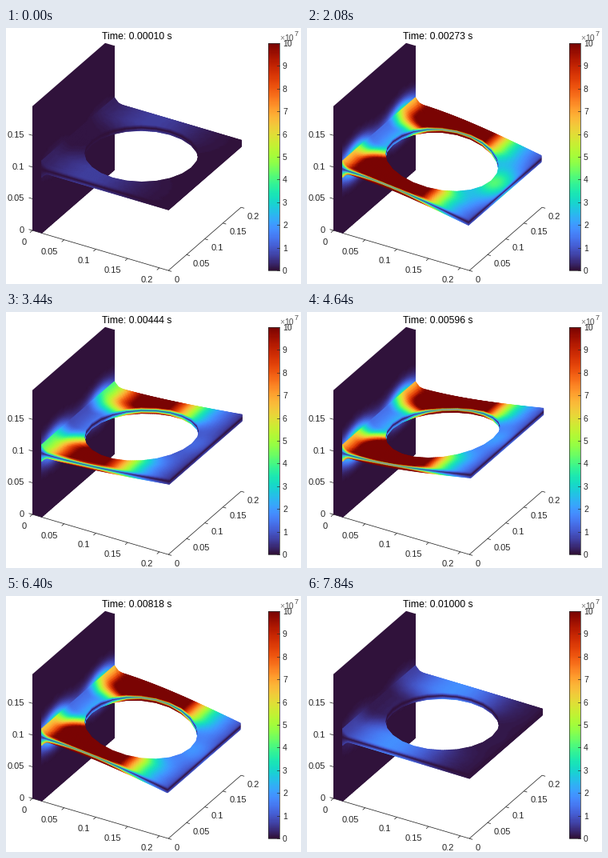
Animation, 369 px wide and 320 px high, one loop 7920 ms. Source, as a matplotlib script:

```python
import numpy as np
import matplotlib.pyplot as plt
from matplotlib.animation import FuncAnimation

W, H, DPI = 369, 320, 100
FRAMES, STEP = 99, 80
X0, SIDE, TOP, MID, HALF = 0.0145, 0.2, 0.196, 0.101, 0.005
HOLE, SIDES = 0.0787, 24
INK = "#262626"

plt.rcParams["font.family"] = "Liberation Sans"
fig = plt.figure(figsize=(W / DPI, H / DPI), dpi=DPI, facecolor="white")
ax = fig.add_axes([0, 0, 1, 1])
ax.set_xlim(0, W)
ax.set_ylim(H, 0)
ax.axis("off")


def project(x, y, z):
    return 33 + 794 * x + 455 * y, 253 + 234 * x - 395 * y - 792 * z


def label(x, y, s, size=8.0, ha="center", color=INK):
    return ax.text(x, y, s, fontsize=size, ha=ha, va="center_baseline", color=color)


def line(xs, ys, width=0.55):
    ax.plot(xs, ys, color=INK, lw=width, solid_capstyle="butt", zorder=1)


# Tip deflection in pixels: cosine swings between turning points
TURNS = [(0, 0), (0.0026, 19.5), (0.0054, -23), (0.0086, 20.5), (0.0115, -21)]


def deflection(t):
    for (a, u), (b, v) in zip(TURNS, TURNS[1:]):
        if t <= b:
            return u + (v - u) * (1 - np.cos(np.pi * (t - a) / (b - a))) / 2
    return 0.0


def smooth(v, lo, hi):
    s = np.clip((v - lo) / (hi - lo), 0, 1)
    return s * s * (3 - 2 * s)


def stress(x, y, u, t):
    amp = np.hypot(u / 10.3, 0.06 + 10 * t)
    off = np.abs(y - 0.1) / 0.1
    band = np.exp(-((x - 0.085) / 0.0686) ** 2)
    across = 0.2 + 0.8 * smooth(off, 0.2, 0.75)
    burst = 0.22 * np.exp(-((t - 0.0027) / 0.0005) ** 2)
    tip = 0.006 * abs(u) + burst
    end = np.exp(-((x - 0.2) / 0.03) ** 2)
    center = np.exp(-((y - 0.1) / 0.045) ** 2)
    return amp * band * across + end * (tip * center + 0.003 * abs(u))


def place(x, y, side, u):
    """Screen position on the bent plate; side runs from -1 (bottom) to 1 (top)."""
    root = np.clip(1 - (x - X0) / 0.011, 0, 1) ** 2
    px, py = project(x, y, MID + side * (HALF + 0.008 * root))
    s = (x - X0) / SIDE
    bend = u * s * s * (3 - s) / 2
    return px - 0.07 * bend, py + bend


def mesh(px, py, c):
    return ax.pcolormesh(px, py, c, shading="gouraud", cmap="turbo",
                         vmin=0, vmax=1, zorder=3)


def ring(theta):
    step = 2 * np.pi / SIDES
    inner = HOLE * np.cos(step / 2) / np.cos(theta % step - step / 2)
    outer = SIDE / 2 / np.maximum(np.abs(np.cos(theta)), np.abs(np.sin(theta)))
    return inner, outer


def polar(theta, r):
    return X0 + SIDE / 2 + r * np.cos(theta), SIDE / 2 + r * np.sin(theta)


# Plate top as a ring between the hole and the square border
angle, frac = np.meshgrid(np.linspace(0, 2 * np.pi, 193),
                          1 - (1 - np.linspace(0, 1, 13)) ** 1.5)
r_in, r_out = ring(angle)
top_x, top_y = polar(angle, r_in + frac * (r_out - r_in))

# Thin faces: far hole rim, front edge, free end
depth = np.linspace(-1, 1, 9)
rim_a, rim_d = np.meshgrid(np.radians(np.linspace(30, 210, 97)), depth)
rim_x, rim_y = polar(rim_a, ring(rim_a)[0])
run, edge_d = np.meshgrid(np.linspace(0, SIDE, 81), depth)
THIN = [
    (rim_x, rim_y, rim_d),
    (X0 + run, 0 * run, edge_d),
    (X0 + SIDE + 0 * run, run, edge_d),
]
wall_y, wall_z = np.meshgrid(np.linspace(0, SIDE, 41), np.linspace(0, TOP, 61))
wall_px, wall_py = project(X0, wall_y, wall_z)


def thin_face(x, y, d, u, t):
    c = stress(x, y, u, t) * (0.06 + 0.94 * np.abs(d))
    return mesh(*place(x, y, d, u), c)


def wall_face(u, t):
    amp = np.hypot(u / 10.3, 0.06 + 10 * t)
    off = np.abs(wall_y - 0.1) / 0.1
    glow = 0.06 + 0.28 * np.exp(-((off - 0.62) / 0.3) ** 2)
    return mesh(wall_px, wall_py,
                amp * glow * np.exp(-((wall_z - 0.1) / 0.021) ** 2))


# Wall silhouette
corners = [(0, 0, 0), (0, 0, TOP), (0, SIDE, TOP), (X0, SIDE, TOP),
           (X0, SIDE, 0), (X0, 0, 0)]
ax.fill(*zip(*[project(*p) for p in corners]), color=plt.get_cmap("turbo")(0.0),
        lw=0, zorder=2)

# Axes with ticks
END = 0.2142
line(*zip(project(0, 0, 0), project(END, 0, 0), project(END, 0.2, 0))
     if False else zip(*[project(0, 0, 0), project(END, 0, 0), project(END, 0.2, 0)]))
line(*zip(*[project(0, 0, 0), project(0, 0, TOP)]))
for i in range(5):
    v = 0.05 * i
    s = f"{v:.2f}".rstrip("0").rstrip(".") if i else "0"
    x, y = project(v, 0, 0)
    line([x, x - 3], [y, y + 2.7])
    label(x - 7.5, y + 14, s, ha="right")
    x, y = project(END, v, 0)
    line([x, x + 4], [y, y + 1.2])
    label(x + 8, y + 10.5, s, ha="left")
    if i < 4:
        x, y = project(0, 0, v)
        line([x, x - 4.5], [y, y - 1.3])
        label(23, y - 1, s, ha="right")

# Colour bar
LEFT, RIGHT, UP, DOWN = 328, 342, 19, 303
ax.imshow(np.linspace(1, 0, 256)[:, None], cmap="turbo", aspect="auto",
          extent=(LEFT, RIGHT, DOWN, UP), zorder=1)
ax.set_xlim(0, W)
ax.set_ylim(H, 0)
ax.plot([LEFT, RIGHT, RIGHT, LEFT, LEFT], [UP, UP, DOWN, DOWN, UP],
        color=INK, lw=0.5, zorder=2)
for i in range(11):
    y = DOWN - (DOWN - UP) * i / 10
    ax.plot([RIGHT - 3, RIGHT], [y, y], color=INK, lw=0.5, zorder=2)
    label(346, y, str(i), 7.5, "left")
label(342, 11.5, "×", 7.5, "left", "#808080")
label(348.5, 11.5, "10", 7.5, "left", "#4d4d4d")
label(360.5, 6, "7", 6.5, "left", "#4d4d4d")

title = label(164, 9.5, "", 8.85, color="black")
faces = []


def draw(k):
    t = (k + 1) * 0.01 / FRAMES
    u = deflection(t)
    while faces:
        faces.pop().remove()
    faces.append(wall_face(u, t))
    faces.append(thin_face(*THIN[0], u, t))
    faces.append(mesh(*place(top_x, top_y, 1, u), stress(top_x, top_y, u, t)))
    faces.extend(thin_face(*f, u, t) for f in THIN[1:])
    title.set_text(f"Time: {t:.5f} s")
    return [*faces, title]


anim = FuncAnimation(fig, draw, frames=FRAMES, interval=STEP, init_func=lambda: [],
                     repeat=True, repeat_delay=0, blit=False)
plt.show()
```
